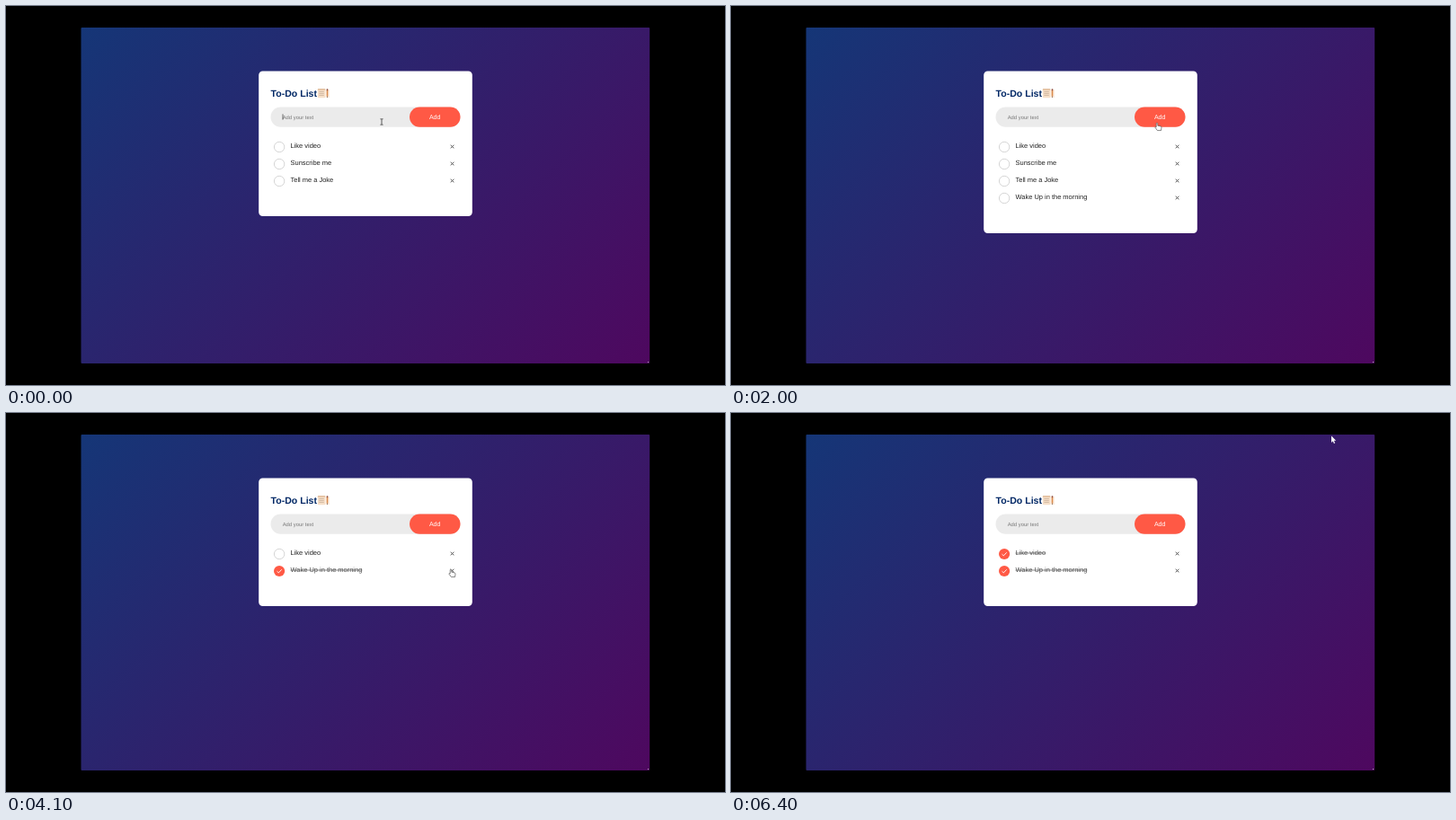
An HTML page with a canvas for the animation above (6500 ms loop, 800 px wide and 422 px high).

```html
<!DOCTYPE html>
<html lang="en">
<head>
<meta charset="utf-8">
<title>To-Do List</title>
<style>
  html, body { margin: 0; width: 100%; height: 100%; overflow: hidden; background: #000; }
  canvas { display: block; width: 800px; height: 422px; }
</style>
</head>
<body>
<canvas id="stage" width="800" height="422"></canvas>
<script>
const ctx = document.getElementById('stage').getContext('2d');
const LOOP = 6500, STEP = 100;
const TYPED = 'Wake Up in the morning';
const TYPE_END = 1500, ADDED = 1800;
const ROW_TOP = 147, ROW_HEIGHT = 19;

// When each task appears, is ticked and is removed
const tasks = [
  { text: 'Like video', from: 0, done: 5400, to: LOOP },
  { text: 'Sunscribe me', from: 0, done: 3600, to: 4100 },
  { text: 'Tell me a Joke', from: 0, done: LOOP, to: 3300 },
  { text: TYPED, from: ADDED, done: 2700, to: LOOP }
];

// Pointer path: time, x, y
const path = [
  [0, 418, 129], [1500, 418, 129], [1800, 474, 130], [2200, 474, 130],
  [2600, 345, 212], [2800, 345, 212], [3000, 368, 194], [3200, 495, 194],
  [3300, 495, 194], [3500, 345, 174], [3600, 345, 174], [3700, 357, 173],
  [4000, 495, 174], [4300, 495, 174], [4600, 480, 200], [5000, 480, 200],
  [5300, 345, 156], [5400, 345, 156], [5700, 238, 58], [5900, 192, 85],
  [6200, 420, 50], [6400, 668, 25.5], [LOOP, 668, 25.5]
];

const smooth = k => k * k * (3 - 2 * k);

function pointerAt(t) {
  const i = path.findIndex(p => p[0] > t);
  const [t0, x0, y0] = path[i - 1], [t1, x1, y1] = path[i];
  const k = smooth((t - t0) / (t1 - t0));
  return [x0 + (x1 - x0) * k, y0 + (y1 - y0) * k];
}

function box(x, y, w, h, r, fill) {
  ctx.fillStyle = fill;
  ctx.beginPath();
  ctx.roundRect(x, y, w, h, r);
  ctx.fill();
}

function line(points, color, width) {
  ctx.strokeStyle = color;
  ctx.lineWidth = width;
  ctx.beginPath();
  points.forEach(([x, y]) => ctx.lineTo(x, y));
  ctx.stroke();
}

function label(text, x, y, size, color, weight = '') {
  ctx.font = `${weight} ${size}px "Liberation Sans", Arial, sans-serif`;
  ctx.fillStyle = color;
  ctx.fillText(text, x, y);
  return ctx.measureText(text).width;
}

function drawBackground() {
  box(0, 0, 800, 422, 0, '#000');
  const shade = ctx.createLinearGradient(148.5, -40.5, 651.5, 462.5);
  shade.addColorStop(0, '#153677');
  shade.addColorStop(1, '#4e085f');
  box(83.5, 24, 632.7, 374, 1, shade);
  box(714, 396, 1, 1, 0, '#b9a6bd');
}

function drawNotepad() {
  box(346.8, 92.3, 8.6, 9.9, 1, '#f6dfc8');
  box(346.8, 92.3, 8.6, 1.3, 0.5, '#dcb48e');
  for (const y of [95.4, 97.4, 99.4]) line([[348.3, y], [353.8, y]], '#b99c86', 0.6);
  box(355.4, 93, 4.4, 9, 0.5, '#fbeadb');
  line([[357.5, 94], [357.5, 100.5]], '#d98a4b', 1.5);
  line([[357.5, 92.3], [357.5, 94.2]], '#8d4a3c', 1.5);
  line([[357.5, 100.5], [357.5, 102]], '#6b4b3c', 0.7);
}

function drawForm(t) {
  label('To-Do List', 294.6, 100.8, 10.56, '#002765', 'bold');
  drawNotepad();
  box(294.5, 112.4, 211, 22.4, 11.2, '#ebebeb');
  box(449, 112.4, 56.5, 22.4, 11.2, '#ff5945');
  label('Add', 470.9, 126, 7.04, '#fff');

  const count = Math.max(0, Math.round((Math.min(t, TYPE_END) - 100) * 17 / 1100));
  const typing = t < ADDED && count > 0;
  const width = typing
    ? label(TYPED.slice(0, count), 307.7, 125.6, 5.87, '#222')
    : label('Add your text', 307.7, 125.6, 5.87, '#777');
  if (t < ADDED) {
    const x = 308 + (typing ? width : 0);
    line([[x, 120.4], [x, 126.6]], '#111', 0.6);
  }
}

function drawTask(task, y, t) {
  const done = t >= task.done;
  ctx.beginPath();
  ctx.arc(304.1, y, done ? 6.1 : 5.7, 0, Math.PI * 2);
  if (done) {
    ctx.fillStyle = '#ff5945';
    ctx.fill();
    line([[301.5, y + 0.2], [303.3, y + 1.9], [306.7, y - 1.7]], '#fff', 0.9);
  } else {
    ctx.strokeStyle = '#d2d2d2';
    ctx.lineWidth = 0.9;
    ctx.stroke();
  }
  const width = label(task.text, 316.5, y + 1.1, 7.48, done ? '#555' : '#222');
  if (done) line([[316.5, y - 1], [316.5 + width, y - 1]], '#555', 0.7);
  for (const s of [-1.8, 1.8]) line([[496.5 - s, y - 2.2], [496.5 + s, y + 1.4]], '#555', 1);
}

function drawPointer(x, y, rows) {
  const within = (l, r, top, bottom) => x > l && x < r && y > top && y < bottom;
  ctx.save();
  ctx.translate(x, y);
  if (within(294, 449, 112, 135)) {
    line([[0, -3], [0, 3]], '#333', 0.8);
    for (const end of [-3.2, 3.2]) line([[-1.6, end], [1.6, end]], '#333', 0.7);
  } else if (within(449, 506, 112, 135) || within(294, 506, ROW_TOP, ROW_TOP + rows * ROW_HEIGHT)) {
    const hand = new Path2D('M-.8 .6Q0-.7.8.6V3.2L4 3.9Q5.1 4.2 5 5.3L4.5 8.6H.4L-2 5.3Q-2.3 4-.8 4.8Z');
    ctx.fillStyle = '#fff';
    ctx.fill(hand);
    ctx.strokeStyle = '#555';
    ctx.lineWidth = 0.7;
    ctx.stroke(hand);
  } else {
    ctx.fillStyle = '#fff';
    ctx.fill(new Path2D('M0 0V7.4L1.7 5.8 2.9 8.5 4.1 8 2.9 5.3H5.2Z'));
  }
  ctx.restore();
}

function draw(t) {
  const shown = tasks.filter(task => t >= task.from && t < task.to);
  drawBackground();
  box(281.2, 72.5, 237.6, 104.5 + shown.length * ROW_HEIGHT, 4.4, '#fff');
  drawForm(t);
  shown.forEach((task, i) => drawTask(task, 157 + i * ROW_HEIGHT, t));
  drawPointer(...pointerAt(t), shown.length);
}

ctx.textRendering = 'geometricPrecision';
const start = performance.now();
function tick() {
  const t = (performance.now() - start) % LOOP;
  draw(Math.floor(t / STEP) * STEP);
  requestAnimationFrame(tick);
}
tick();
</script>
</body>
</html>
```
